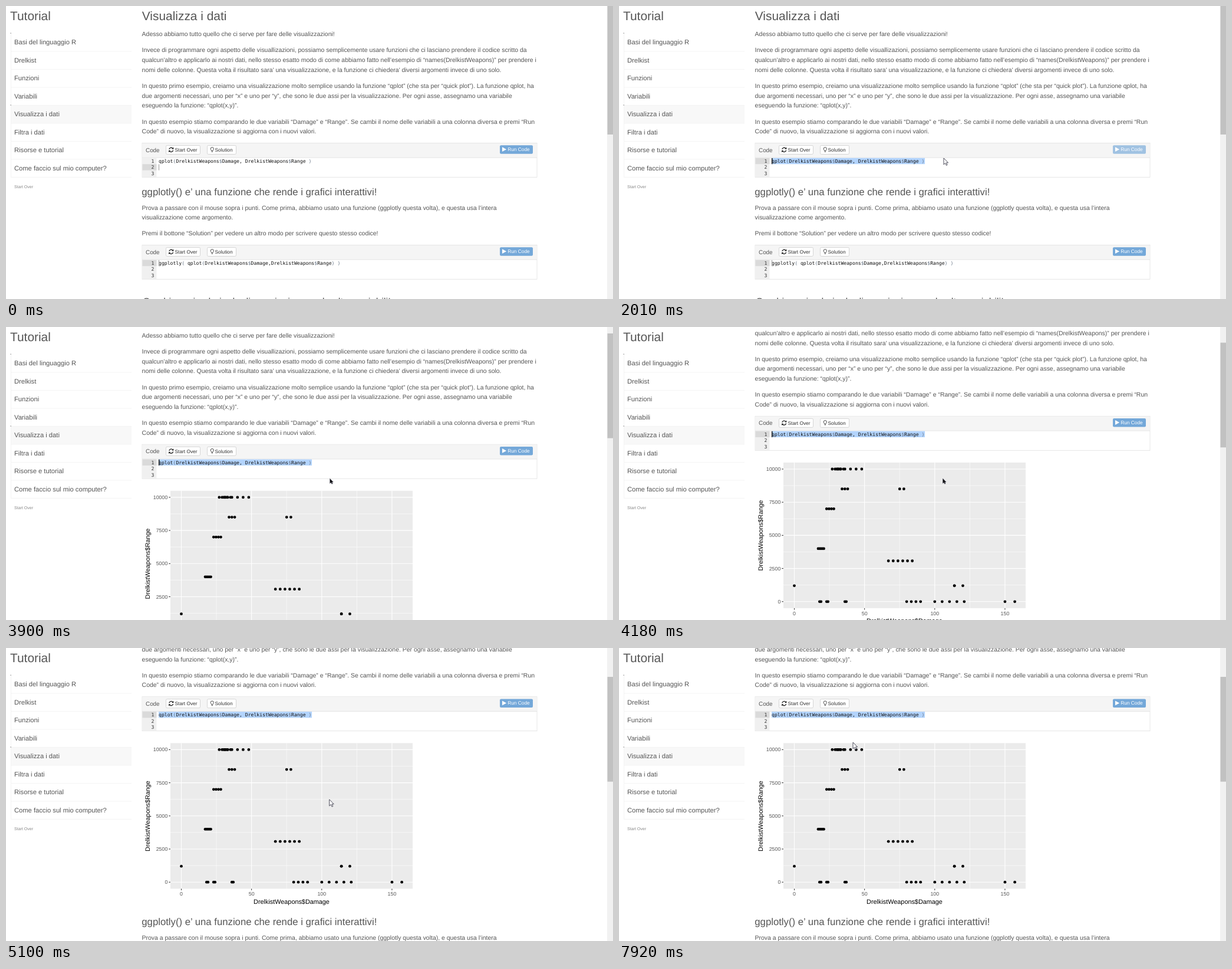
An HTML page for the animation above (8000 ms loop, 1030 by 497 pixels).

```html
<!DOCTYPE html>
<html lang="it">
<head>
<meta charset="utf-8">
<title>Tutorial</title>
<style>
html, body { margin: 0; width: 100%; height: 100%; overflow: hidden; background: #fff; }
svg { display: block; font: 10.46px "Liberation Sans", Arial, sans-serif; fill: #555; text-rendering: geometricPrecision; }
text { white-space: pre; }
.mono { font: 8.15px "DejaVu Sans Mono", "Liberation Mono", monospace; }
</style>
</head>
<body>
<svg id="stage" width="1030" height="497" viewBox="0 0 1030 497"></svg>
<script>
const text = (x, y, s, size = 10.46, extra = '') =>
  `<text x="${x}" y="${y}" font-size="${size}" ${extra}>${s}</text>`;
const rect = (x, y, w, h, fill, extra = '') =>
  `<rect x="${x}" y="${y}" width="${w}" height="${h}" fill="${fill}" ${extra}/>`;
const path = (d, extra) => `<path d="${d}" ${extra}/>`;
const end = 'text-anchor="end"', middle = 'text-anchor="middle"';

const DATA = 'DrelkistWeapons';
const CHAR = 4.906, CODE_X = 259, CODE_LINE = 10.46, LINE = 16.73;
const code = `qplot(${DATA}$Damage, ${DATA}$Range )`;

function sidebar() {
  const items = ['Basi del linguaggio R', 'Drelkist', 'Funzioni', 'Variabili', 'Visualizza i dati',
    'Filtra i dati', 'Risorse e tutorial', 'Come faccio sul mio computer?'];
  let s = text(7, 23.8, 'Tutorial', 20.9) + rect(8, 168.5, 205, 30.5, '#f8f8f8')
    + path('M8.5 46V290.5', 'stroke="#f3f3f3"');
  items.forEach((item, i) => {
    const y = 46.5 + 30.5 * i;
    s += text(14, y + 18.5, item, 11.2) + path(`M8 ${y + 30.5}H213`, 'stroke="#f4f4f4"');
    if (i % 4 === 0) s += rect(7.5, y - 1, 1.2, 1.2, '#777');
  });
  return s + text(14, 309, 'Start Over', 7.05, 'fill="#888"');
}

// Lines with a regular pitch and a gap after each paragraph.
function paragraphs(y, list) {
  let s = '';
  for (const lines of list) {
    for (const line of lines) {
      s += text(230.6, y, line);
      y += LINE;
    }
    y += 10.4;
  }
  return s;
}

function button(x, w, label, labelX) {
  return rect(x + .5, 236.5, w - 1, 15, '#fff', 'stroke="#ccc" stroke-width=".8" rx="2"')
    + text(labelX, 247, label, 8.36, 'fill="#333"');
}

// Editor panel; the id prefix names the parts that change.
function editor(id, source) {
  let s = rect(231, 232.5, 670, 58, '#fff', 'stroke="#e0e0e0" stroke-width=".8"')
    + rect(231.4, 233, 669.2, 24, '#f5f5f5') + path('M231 257.2H901', 'stroke="#ddd" stroke-width=".8"')
    + rect(231.4, 257.6, 24, 32.5, '#f0f0f0')
    + rect(231.4, 257.8, 24, 10.4, '#dadada', `id="${id}Row"`)
    + rect(CODE_X, 257.8, 0, 10.4, '#b3d4fd', `id="${id}Sel"`)
    + text(237, 247.5, 'Code', 9.9)
    + button(271, 59, 'Start Over', 286.5) + button(341, 50, 'Solution', 354.5)
    + path('M276.8 243.2a3.5 3.5 0 0 1 6.2-1.6M283.6 244.6a3.5 3.5 0 0 1-6.2 1.6', 'fill="none" stroke="#222" stroke-width="1.3"')
    + path('M284.4 239.6v3.2h-3.3zM276 248.2v-3.2h3.3z', 'fill="#222"')
    + path('M348.6 245.6c0-1.2-1.4-1.7-1.4-3.3a2.6 2.6 0 0 1 5.2 0c0 1.6-1.4 2.1-1.4 3.3zM348.6 247.2h2.4', 'fill="none" stroke="#333" stroke-width=".9"')
    + rect(838, 236.2, 56, 14.5, '#74a8d9', `id="${id}Run" rx="2"`)
    + path('M842 239.3l7.2 3.9-7.2 3.9z', 'fill="#fff"')
    + text(851.2, 246.3, 'Run Code', 8.36, 'fill="#fff"');
  for (let i = 0; i < 3; i++)
    s += text(251.5, 266 + CODE_LINE * i, i + 1, 8, `class="mono" fill="#333" ${end}`);
  return s
    + text(CODE_X, 266, source.replace(/[()$]/g, '<tspan fill="#687687">$&</tspan>'), 8, 'class="mono" fill="#111"')
    + rect(CODE_X, 258, 1, 10.2, '#999', `id="${id}Caret"`);
}

function plot() {
  const px = v => 297.5 + 2.383 * v, py = v => 547 - .02248 * v;
  let s = rect(279, 311.1, 411, 247, '#ebebeb');
  for (let v = 0; v <= 150; v += 25) {
    const major = v % 50 === 0, x = px(v);
    s += path(`M${x} 311.1v247`, `stroke="#fff" stroke-width="${major ? 1.1 : .55}"`);
    if (major) s += path(`M${x} 558.1v2.7`, 'stroke="#333"') + text(x, 569.8, v, 8.8, middle);
  }
  for (let v = 0; v <= 10000; v += 1250) {
    const major = v % 2500 === 0, y = py(v);
    s += path(`M279 ${y}H690`, `stroke="#fff" stroke-width="${major ? 1.1 : .55}"`);
    if (major) s += path(`M276.2 ${y}h2.8`, 'stroke="#333"') + text(274.3, y + 3.1, v, 8.8, end);
  }
  // Evenly spaced runs of points at one range.
  const run = (range, first, step, count) => {
    for (let i = 0; i < count; i++)
      s += `<circle cx="${px(first + step * i)}" cy="${py(range)}" r="2.4" fill="#000"/>`;
  };
  run(10000, 27, 2, 5);
  run(10000, 30, 1, 4);
  run(10000, 36, 4, 4);
  run(8500, 34, 2, 3);
  run(8500, 75, 3, 2);
  run(7000, 23, 1.7, 4);
  run(4000, 17, 1, 5);
  run(3072, 67, 3.4, 6);
  run(1200, 0, 114, 2);
  run(1200, 114, 6, 2);
  for (const first of [18, 23, 36]) run(0, first, 1, 2);
  run(0, 80, 3.3, 4);
  run(0, 100, 5.25, 5);
  run(0, 150, 7, 2);
  return s + text(484.5, 583.6, DATA + '$Damage', 10.85, middle + ' fill="#000"')
    + text(0, 0, DATA + '$Range', 10.85, middle + ' fill="#000" transform="translate(244.3 434.8) rotate(-90)"');
}

const intro = [
  ['Adesso abbiamo tutto quello che ci serve per fare delle visualizzazioni!'],
  ['Invece di programmare ogni aspetto delle visuallizazioni, possiamo semplicemente usare funzioni che ci lasciano prendere il codice scritto da',
    `qualcun’altro e applicarlo ai nostri dati, nello stesso esatto modo di come abbiamo fatto nell’esempio di “names(${DATA})” per prendere i`,
    'nomi delle colonne. Questa volta il risultato sara’ una visualizzazione, e la funzione ci chiedera’ diversi argomenti invece di uno solo.'],
  ['In questo primo esempio, creiamo una visualizzazione molto semplice usando la funzione “qplot” (che sta per “quick plot”). La funzione qplot, ha',
    'due argomenti necessari, uno per “x” e uno per “y”, che sono le due assi per la visualizzazione. Per ogni asse, assegnamo una variabile',
    'eseguendo la funzione: “qplot(x,y)”.'],
  ['In questo esempio stiamo comparando le due variabili “Damage” e “Range”. Se cambi il nome delle variabili a una colonna diversa e premi “Run',
    'Code” di nuovo, la visualizzazione si aggiorna con i nuovi valori.']
];
const outro = [
  ['Prova a passare con il mouse sopra i punti. Come prima, abbiamo usato una funzione (ggplotly questa volta), e questa usa l’intera',
    'visualizzazione come argomento.'],
  ['Premi il bottone “Solution” per vedere un altro modo per scrivere questo stesso codice!']
];

const stage = document.getElementById('stage');
stage.innerHTML = sidebar()
  + '<g id="page">' + text(230.8, 23.8, 'Visualizza i dati', 20.9) + paragraphs(51.2, intro) + editor('a', code)
  + `<g id="plot">${plot()}</g><g id="lower">`
  + text(230.3, 321.2, 'ggplotly() e’ una funzione che rende i grafici interattivi!', LINE) + paragraphs(345.6, outro)
  + '<g transform="translate(0 173)">' + editor('b', `ggplotly( qplot(${DATA}$Damage,${DATA}$Range) )`) + '</g>'
  + text(232, 507.3, 'Cambiamo i colori e le dimensioni secondo altre variabili!', LINE) + '</g></g>'
  + rect(1020, 0, 10, 497, '#f1f1f1') + rect(1020.5, 0, 9.5, 218, '#c1c1c1', 'id="thumb"')
  + path('M0 0V11.5L2.7 9 4.6 13 6.4 12.2 4.6 8.3H8Z', 'id="mouse" stroke="#334" stroke-width=".9" stroke-linejoin="round"');

const set = (id, attrs) => {
  const node = document.getElementById(id);
  for (const k in attrs) node.setAttribute(k, attrs[k]);
};
const show = (id, on) => set(id, { visibility: on ? 'visible' : 'hidden' });

// Linear motion through key points [ms, ...values].
function tween(keys, t) {
  const i = keys.findLastIndex(k => k[0] <= t);
  const a = keys[i], b = keys[i + 1] || a;
  const p = (t - a[0]) / (b[0] - a[0] || 1);
  return a.slice(1).map((v, j) => v + (b[j + 1] - v) * p);
}
const mousePath = [[0, 545, 264], [430, 521, 262], [1170, 204, 262], [2010, 551, 258], [5100, 549, 257],
  [5710, 350, 188], [6900, 345, 180], [7200, 290, 340], [7500, 570, 420], [7920, 397, 160]];
const scrollPath = [[0, 0], [3700, 0], [3900, 33.3], [4180, 81.2], [4460, 149.8]];
const SCROLL_TICK = 140;

function draw(now) {
  const t = now % 8000;
  const [mx, my] = tween(mousePath, t);
  const [scroll] = tween(scrollPath, t - (t + 20) % SCROLL_TICK < 0 ? 0 : t - (t + 20) % SCROLL_TICK);
  const plotted = t >= 3010, selecting = t >= 430, scrolling = t >= 3740 && t < 4600;

  set('page', { transform: `translate(0 ${-scroll})` });
  set('lower', { transform: `translate(0 ${plotted ? 299 : 0})` });
  show('plot', plotted);
  set('thumb', { y: scroll * .327, height: plotted ? 177.7 : 218 });
  set('aRun', { opacity: t >= 2010 && !plotted ? .65 : 1 });

  // The text is selected by dragging from its right end to its left.
  const size = code.length;
  const left = t < 1170 ? Math.max(0, Math.min(size, Math.round((mx - CODE_X) / CHAR))) : 0;
  const x = CODE_X + (selecting ? left * CHAR : 0), row = selecting ? 0 : CODE_LINE;
  set('aRow', { y: 257.8 + row });
  set('aSel', { x, width: selecting ? (size - left) * CHAR : 0 });
  set('aCaret', { x, y: 258 + row, width: selecting ? 1.4 : 1, fill: selecting ? '#000' : '#999' });
  show('aCaret', !plotted || scrolling);

  show('mouse', t >= 150);
  set('mouse', { transform: `translate(${mx} ${my}) scale(${scrolling ? .68 : .95})`, fill: scrolling ? '#111' : '#fff' });
}

const start = performance.now();
function loop() {
  draw(performance.now() - start);
  requestAnimationFrame(loop);
}
loop();
</script>
</body>
</html>
```
